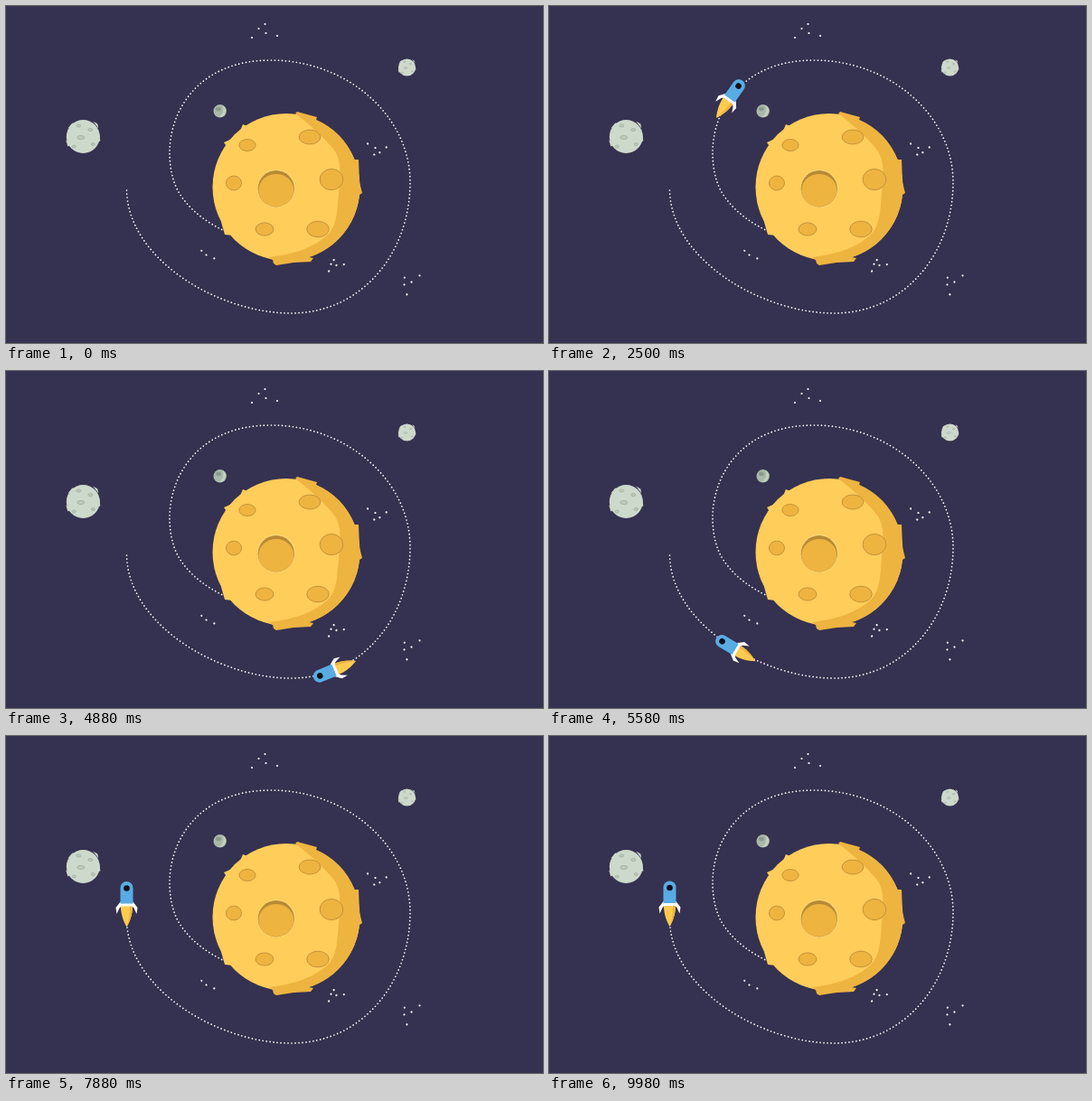
Write an HTML page that moves like this. It is 594 px wide and 373 px high and loops after 10 s.

```html
<!DOCTYPE html>
<html lang="en">
<head>
<meta charset="utf-8">
<title>Rocket orbit</title>
<style>
html, body { margin: 0; width: 100%; height: 100%; overflow: hidden; background: #353150; }
svg { display: block; }
</style>
</head>
<body>
<svg width="594" height="373" viewBox="0 0 594 373">
  <defs>
    <g id="moon">
      <circle r="18.5" fill="#cdd9ca"/>
      <path fill="#cdd9ca" d="M-17-9l5-6 4 2zM11-17l5 3 1 5zM-19 4l2 7 5-3zM18-3l1 8-4 1z"/>
      <g fill="#bfccbc" stroke="#98a698" stroke-width=".7">
        <ellipse cx="-5" cy="-12" rx="2.5" ry="1.5"/>
        <ellipse cx="8" cy="-7.5" rx="2.5" ry="1.5"/>
        <ellipse cx="-2.500" cy="1" rx="4" ry="2"/>
        <ellipse cx="-10" cy="11" rx="2" ry="1.5"/>
        <ellipse cx="11" cy="8.500" rx="2" ry="1.5"/>
      </g>
    </g>
  </defs>
  <rect width="594" height="373" fill="#353150"/>
  <g id="stars" fill="#fff"></g>

  <path id="orbit" fill="none" stroke="#fff" stroke-width="1.7" stroke-linecap="round" stroke-dasharray="0 4"
    d="M246 251C222 240 203 226 191 206C184 194 181 178 181 162C181 118 211 60 293 60C378 60 447 122 447 195C447 272 395 340 315 340C235 340 134 280 133.5 203"/>

  <use href="#moon" x="85.3" y="144.5"/>
  <use href="#moon" transform="translate(443.5 68) scale(.52)"/>
  <circle cx="236.700" cy="116.300" r="7.200" fill="#a9b8a8"/>
  <path d="M240 110a7.200 7.200 0 0 1-5 13q7-4 5-13z" fill="#c3d0c0"/>
  <ellipse cx="235" cy="114" rx="3" ry="2.300" fill="#8d9b8e"/>

  <g fill="#ffcd5a">
    <circle cx="310" cy="200.5" r="81.500"/>
    <path d="M247 160L241 151L250 147L253 142L259 138L262 131L267 133L270 130L273 137ZM238 239L242 253L251 254L258 263L268 250Z"/>
  </g>
  <path fill="#eeb440" d="M320 119L322 117L344 123L343 126A81.500 81.500 0 0 1 385.600 170L390 170L391 195L394 207L391 209A81.500 81.500 0 0 1 335 278L340 279L337 283L318 284L299 287L296 285L295 281L291 278Q335 273 356 253C368 241 366 222 369 197Q372 168 361 157Q345 138 320 119Z"/>
  <g id="craters" fill="#eeb440" stroke="#bf8f38" stroke-width=".9"></g>
  <circle cx="299" cy="202" r="21" fill="#ffdc80"/>
  <circle cx="298.800" cy="202.200" r="20.200" fill="#b98a33"/>
  <ellipse cx="298.800" cy="204" rx="19.500" ry="18" fill="#eeb440"/>

  <g id="rocket">
    <path fill="#ffcb4f" d="M-6.500 0H6.500C7 9 4 18 0 25C-4 18-7 9-6.500 0Z"/>
    <path fill="#eeb440" d="M3.500 0H6.500C7 9 4 18 0 25Q4 13 3.500 0Z"/>
    <path fill="#fff" d="M-7-3L-12 3.500L-11 10.500L-8 4L-6 2H6L8 4L11 10.500L12 3.500L7-3Z"/>
    <path fill="#58ace3" d="M-7-1V-18.500A7 7 0 0 1 7-18.500V-1Z"/>
    <circle cy="-18" r="3.300" fill="#111018"/>
  </g>
</svg>
<script>
const LOOP = 10000, APPEAR = 480, START = 500, TRAVEL = 6020;
const REST = { x: 133.5, y: 186 }, BOB = { size: 8, period: 1410, zero: 9980 };
const NS = 'http://www.w3.org/2000/svg';
const $ = id => document.getElementById(id);

function add(parent, tag, attrs) {
  const el = document.createElementNS(NS, tag);
  for (const key in attrs) el.setAttribute(key, attrs[key]);
  return parent.appendChild(el);
}

// One star pattern, turned and scaled for each cluster
const pattern = [[0, 0], [-8, -5], [12.5, 3], [-1, -10], [-15.5, 5]];
function cluster(x, y, turn, scale, count = 5) {
  const transform = `translate(${x} ${y}) rotate(${turn}) scale(${scale})`;
  const g = add($('stars'), 'g', { transform });
  for (const [cx, cy] of pattern.slice(0, count)) add(g, 'circle', { cx, cy, r: 1.1 / scale });
}
cluster(287.5, 30, 0, 1);
cluster(408.5, 157, 195, .75);
cluster(221.5, 275.5, 10, .75, 3);
cluster(365.5, 287, -20, .65);
cluster(448.5, 305.5, -52, .9);

// Craters grow to the right and flatten towards the poles
for (const [cx, cy] of [[267, 154], [336, 145], [252, 196], [360, 192], [286, 247], [345, 247]]) {
  const rx = 8.5 + (cx - 252) * .04;
  const ry = rx * (.95 - Math.abs(cy - 201) * .005);
  add($('craters'), 'ellipse', { cx, cy, rx, ry });
}

// cubic-bezier(.405, 0, .854, 1)
function ease(x) {
  let lo = 0, hi = 1;
  for (let i = 0; i < 24; i++) {
    const s = (lo + hi) / 2, r = 1 - s;
    if (3 * r * r * s * .405 + 3 * r * s * s * .854 + s ** 3 < x) lo = s; else hi = s;
  }
  return lo * lo * (3 - 2 * lo);
}

const bobY = t => REST.y - BOB.size * Math.sin(2 * Math.PI * (t - BOB.zero) / BOB.period);

// The flight continues a little beyond the dotted line
const route = document.createElementNS(NS, 'path');
route.setAttribute('d', `${$('orbit').getAttribute('d')}L${REST.x} ${bobY(START + TRAVEL)}`);
const length = route.getTotalLength();

function pose(t) {
  if (t >= START + TRAVEL) return { x: REST.x, y: bobY(t), angle: 0 };
  const at = length * ease(Math.max(0, (t - START) / TRAVEL));
  const p = route.getPointAtLength(at);
  const back = route.getPointAtLength(Math.max(0, at - 12));
  const front = route.getPointAtLength(Math.min(length, at + 12));
  const angle = Math.atan2(front.y - back.y, front.x - back.x) * 180 / Math.PI + 90;
  return { x: p.x, y: p.y, angle };
}

const origin = performance.now();
function draw() {
  const t = (performance.now() - origin) % LOOP;
  const { x, y, angle } = pose(t);
  $('rocket').setAttribute('visibility', t < APPEAR ? 'hidden' : 'visible');
  $('rocket').setAttribute('transform', `translate(${x} ${y}) rotate(${angle})`);
  requestAnimationFrame(draw);
}
draw();
</script>
</body>
</html>
```
